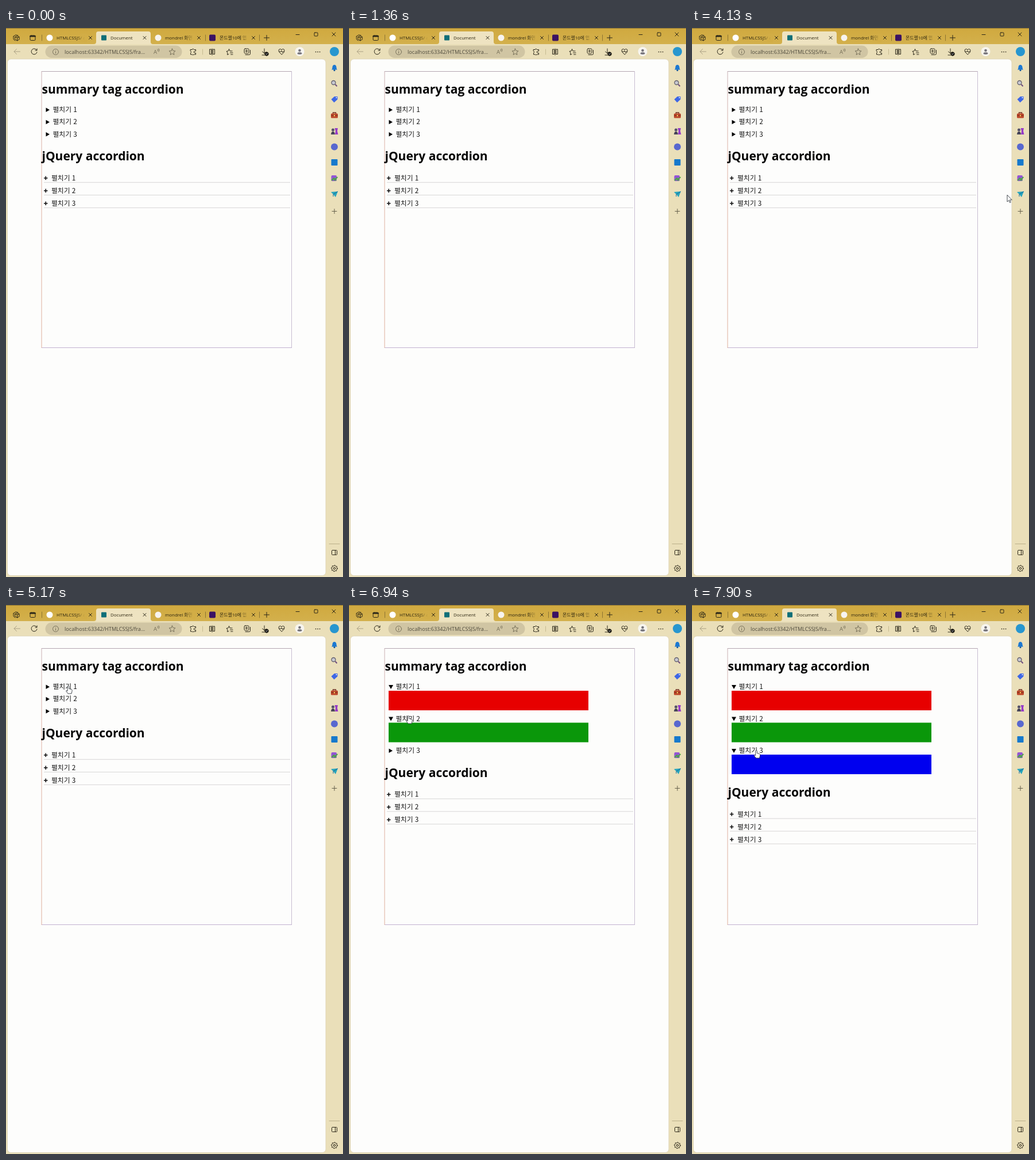
Recreate the animation shown at these times as an HTML page. Size 587 by 954 pixels, loop 8000 ms.

```html
<!DOCTYPE html>
<html lang="ko">
<head>
<meta charset="utf-8">
<title>Accordion demo</title>
<style>
  html, body { margin: 0; width: 100%; height: 100%; overflow: hidden; background: #eadfb9; }
  svg { display: block; width: 587px; height: 954px; }
  text { font-family: "Open Sans", "Noto Sans CJK KR", "Noto Sans CJK", sans-serif; fill: #151515; white-space: pre; }
  .heading { font-size: 21px; font-weight: 700; fill: #060606; }
  .row { font: 11.8px "Noto Sans CJK KR", "Noto Sans CJK", sans-serif; }
  .tab { font-size: 7.9px; fill: #2b240f; }
  .icon { fill: none; stroke: #2a2618; stroke-width: 1; stroke-linecap: round; stroke-linejoin: round; }
</style>
</head>
<body>
<svg viewBox="0 0 587 954">
  <defs>
    <linearGradient id="strip" x2="0" y2="1">
      <stop stop-color="#d0a93f"/><stop offset="1" stop-color="#d3b04c"/>
    </linearGradient>
    <linearGradient id="fade">
      <stop stop-color="#d2ad46" stop-opacity="0"/><stop offset=".8" stop-color="#d2ad46"/>
    </linearGradient>
    <linearGradient id="edge" x2="0" y2="1">
      <stop stop-color="#c8b0b4"/><stop offset=".3" stop-color="#dfb2a4"/><stop offset="1" stop-color="#dfae9c"/>
    </linearGradient>
  </defs>

  <!-- Window -->
  <rect width="587" height="954" fill="#eadfb9"/>
  <rect width="587" height="28" fill="url(#strip)"/>
  <path d="M0 .5H587" stroke="#8c7434"/>
  <path d="M153 28Q157 28 157 24V10Q157 6 161 6H248Q252 6 252 10V24Q252 28 256 28Z" fill="#eee3c1"/>
  <rect x="2.5" y="54" width="554.5" height="897.5" rx="6" fill="#fdfdfc" stroke="#d9ceb0" stroke-width=".7"/>

  <!-- Tabs -->
  <circle cx="76" cy="17" r="5.5" fill="#fff"/>
  <text class="tab" x="88" y="20">HTMLCSSJS/ a</text>
  <rect x="166" y="12.5" width="9" height="9" rx="1" fill="#0f6f78"/>
  <text class="tab" x="182" y="20">Document</text>
  <circle cx="265" cy="17" r="5.5" fill="#f7f4f0"/>
  <text class="tab" x="277" y="20">mondrel 화면</text>
  <rect x="354" y="11.5" width="11" height="11" rx="2" fill="#3b1263"/>
  <text class="tab" x="372" y="20">몬드렐10에 앱</text>
  <g id="tabEnds"></g>
  <g class="icon">
    <path d="M62.5 12V22M347.5 12V22M441.5 12V22" stroke="#8d7432"/>
    <path d="M449.500 17H458.500M454 12.500V21.500"/>
    <path d="M13 14.500L17 12L21 13M13 14.500V19.500L16 22M16 15.500L19.500 14L23 15.500V20L19.500 22L16 20ZM16 15.500L19.500 17L23 15.500M19.500 17V22"/>
    <rect x="42" y="13" width="9" height="8.500" rx="1.500"/>
    <path d="M42.500 14.300H50.500" stroke-width="2.500"/>
    <path d="M505 11.500H511M568 8L574 14M574 8L568 14"/>
    <rect x="537" y="8" width="6" height="6" rx="1"/>
  </g>

  <!-- Toolbar -->
  <rect x="68.500" y="30.500" width="238" height="21.500" rx="10.700" fill="#d0c5a3"/>
  <text x="102" y="44.700" font-size="9.150" style="fill:#4e4a3c">localhost:63342/HTMLCSSJS/fra...</text>
  <text x="257" y="45" font-size="9.500" style="fill:#777059">A</text>
  <g class="icon">
    <path d="M24.500 41H14M18.500 36.500L14 41L18.500 45.500" stroke="#aaa083"/>
    <path d="M53.500 38.500A5 5 0 1 0 54 42M54 36V39H51"/>
    <g stroke="#777059">
      <circle cx="86.500" cy="41.500" r="5"/><path d="M86.500 41V44M86.500 39V39.100"/>
      <path d="M264 37Q265.500 38.500 264 40M266 36Q268 38.500 266 41"/>
      <path id="star" d="M289.500 36L291.100 39.600L295 40L292 42.700L292.900 46.500L289.500 44.500L286.100 46.500L287 42.700L284 40L287.900 39.600Z"/>
    </g>
    <path d="M321.500 37.500H324.500Q325 34.500 327.500 37.500H330.500V40Q327 40 327 41.700Q327 43.500 330.500 43.500V46H327.500Q325 48 324.500 46H321.500V43.500Q324 42 321.500 40Z"/>
    <path d="M342.500 37V46" stroke="#c7bb91"/>
    <path d="M357 37H354.500V45.500H357ZM361 37H363.500V45.500H361ZM359 36V47"/>
    <path d="M388 45.500L385.500 46.500L386 43L384 40.500L387 40L388.500 36.500L390 40H394M390.500 43H395M391.500 46H395"/>
    <rect x="415" y="36" width="8" height="8" rx="1.500"/>
    <path d="M417 46.500H423.500Q425.500 46.500 425.500 44.500V38.500M419 38V42M417 40H421"/>
    <path d="M450 36V44M446.500 41L450 44L452 42M446 47H451"/>
    <circle cx="454" cy="45" r="3.200" fill="#111"/><path d="M452.500 45L453.700 46L455.500 44" stroke="#fff" stroke-width=".8"/>
    <path d="M480 46L475.500 41.500Q474 37 477.500 36.500Q479 36.500 480 38Q481 36.500 482.500 36.500Q486 37 484.500 41.500ZM476 41H479L480 39.500L481.500 42.500L482.500 41H484"/>
    <path d="M539.500 41.500H539.600M543 41.500H543.100M546.500 41.500H546.600" stroke-width="1.700"/>
  </g>
  <circle cx="511.500" cy="41" r="8" fill="#f7f5ef"/>
  <circle cx="511.500" cy="39" r="2.300" fill="#77757c"/>
  <path d="M507.500 45Q507.500 42.300 510 42.300H513Q515.500 42.300 515.500 45Q511.500 47 507.500 45Z" fill="#77757c"/>
  <circle cx="572" cy="41" r="8" fill="#2796cf"/>

  <!-- Sidebar -->
  <path d="M567 72.500Q568.500 71 568.500 68Q569 64 572 64Q575 64 575.500 68Q575.500 71 577 72.500Z" fill="#1b78d2"/>
  <circle cx="572" cy="73.500" r="1.500" fill="#0e559f"/>
  <circle cx="570.500" cy="95" r="3.500" fill="#c8c8d2" stroke="#62606c" stroke-width="1.300"/>
  <path d="M573.500 98L576.500 101.300" stroke="#6c4a7d" stroke-width="2"/>
  <path d="M566.500 124L572 119H577.500V124L571.500 129.500Z" fill="#3e67e5"/><circle cx="575.500" cy="121" r="1" fill="#fff"/>
  <path d="M569.500 149V147H574.500V149" fill="none" stroke="#722f22" stroke-width="1.300"/>
  <rect x="566" y="148.500" width="12" height="8" rx="1.500" fill="#bd482b"/><path d="M566 152H578" stroke="#752718"/>
  <rect x="571" y="151" width="2" height="2.500" fill="#efc15d"/>
  <path d="M573 185L574 179L572.500 174H578L577 179L578.500 185Z" fill="#963bc7"/>
  <circle cx="569.500" cy="177" r="2.500" fill="#555269"/><path d="M566 185Q566 182 568 180H571Q573 182 573 185Z" fill="#464458"/>
  <circle cx="572" cy="206.500" r="6" fill="#5868cf"/>
  <rect x="566.500" y="228" width="11" height="11" rx="1" fill="#1679cc"/>
  <rect x="566.500" y="256" width="9.500" height="10" rx="2" fill="#9454d5"/>
  <path d="M567 265L571 261L575 265M571 265L577.500 259" stroke="#49a647" stroke-width="2" fill="none"/>
  <path d="M566 285L578 284L574 294L571 290Z" fill="#26a5bd"/><path d="M578 284L570 289L570 293" fill="none" stroke="#156a9b"/>
  <g class="icon">
    <path d="M568 318.500H576M572 314.500V322.500" stroke="#655f4b"/>
    <path d="M563 896.500H581" stroke="#bbaf8a"/>
    <rect x="567.500" y="907.500" width="9" height="8" rx="1"/><path d="M573.500 907.500V915.500"/>
    <circle cx="572" cy="939" r="1.700"/>
    <path id="gear"/>
  </g>

  <!-- Page -->
  <g fill="none">
    <path d="M62 75.500H497.500" stroke="#b4a6b1"/>
    <path d="M497.500 75V556" stroke="#c8bdd2"/>
    <path d="M62 555.500H498" stroke="#c2b2d0"/>
    <rect x="61.500" y="75" width="1" height="481" fill="url(#edge)"/>
  </g>
  <text class="heading" x="62.500" y="114">summary tag accordion</text>
  <g id="details"></g>
  <g id="jquery"><text class="heading" x="62.500" y="230">jQuery accordion</text></g>

  <g id="cursor" fill="#fff" stroke="#333940" stroke-width=".9" stroke-linejoin="round">
    <path id="hand" d="M-1.300 7V.8Q0-.8 1.300 .8V5L5.500 6Q7 6.500 6.600 9L5.500 13.500H-.5L-3.600 9.500Q-4 7.800-2.600 8L-1.300 9Z"/>
    <path id="arrow" d="M0 0V12L2.800 9.500L4.600 13.500L6.300 12.700L4.500 8.800H8.300Z"/>
  </g>
</svg>
<script>
const LOOP = 8000, PITCH = 21.25, PANEL = 34.25;
const panels = [
  { color: '#e70000', opensAt: 5340 },
  { color: '#0a970a', opensAt: 6940 },
  { color: '#0000ef', opensAt: 7840 }
];
// Cursor rests and turning points: time, x, y
const path = [
  [3870, 560, 330], [4130, 549, 290], [4400, 549, 290], [5170, 108.5, 140.5],
  [5640, 108.5, 140.5], [6140, 101.5, 181.5], [6400, 92, 189],
  [6600, 92, 189], [6770, 103.5, 192.5], [6940, 103.5, 192.5],
  [7540, 112, 252.5], [LOOP, 112, 252.5]
];
const $ = id => document.getElementById(id);

function add(parent, tag, attrs, text = '') {
  const node = document.createElementNS('http://www.w3.org/2000/svg', tag);
  for (const key in attrs) node.setAttribute(key, attrs[key]);
  node.textContent = text;
  return parent.appendChild(node);
}
const move = (node, x, y) => node.setAttribute('transform', `translate(${x} ${y})`);
const show = (node, on) => node.setAttribute('visibility', on ? 'visible' : 'hidden');

for (const x of [147, 241.5, 336, 431]) {
  if (x !== 241.5) add($('tabEnds'), 'rect', { x: x - 24, y: 10, width: 18, height: 15, fill: 'url(#fade)' });
  add($('tabEnds'), 'path', { class: 'icon', d: `M${x - 2.5} 14.5l5 5m0-5l-5 5` });
}

const teeth = Array.from({ length: 32 }, (_, i) => {
  const angle = i * Math.PI / 16, radius = i % 4 < 2 ? 5.5 : 4.2;
  return `${572 + radius * Math.cos(angle)} ${939 + radius * Math.sin(angle)}`;
});
$('gear').setAttribute('d', `M${teeth.join('L')}Z`);

panels.forEach((panel, i) => {
  const label = `펼치기 ${i + 1}`;
  panel.row = add($('details'), 'g', {});
  add(panel.row, 'text', { class: 'row', x: 81.5, y: 146.2 }, label);
  panel.closed = add(panel.row, 'path', { d: 'M69.5 138.500L76 142.200L69.500 146Z' });
  panel.opened = add(panel.row, 'path', { d: 'M69 139H77L73 146Z' });
  panel.box = add(panel.row, 'rect', { x: 69, y: 149, width: 348, height: 34, fill: panel.color });

  const y = 260.8 + i * 22;
  add($('jquery'), 'path', { d: `M66 ${y}h6.500M69.250 ${y - 3.2}v6.400`, stroke: '#111', 'stroke-width': 1.6 });
  add($('jquery'), 'text', { class: 'row', x: 79, y: y + 4 }, label);
  add($('jquery'), 'path', { d: `M66 ${268.3 + i * 22}H495`, stroke: '#d8d6d6' });
});

function cursorAt(t) {
  const next = Math.max(1, path.findIndex(point => point[0] > t));
  const [t0, x0, y0] = path[next - 1], [t1, x1, y1] = path[next];
  const p = Math.min(1, Math.max(0, (t - t0) / (t1 - t0)));
  const eased = p * p * (3 - 2 * p);
  return [x0 + (x1 - x0) * eased, y0 + (y1 - y0) * eased];
}

function draw(t) {
  const [x, y] = cursorAt(t);
  let shift = 0, overPanel = false;
  panels.forEach((panel, i) => {
    const open = t >= panel.opensAt, top = i * PITCH + shift;
    move(panel.row, 0, top);
    show(panel.closed, !open);
    show(panel.opened, open);
    show(panel.box, open);
    if (open) {
      overPanel ||= y > top + 150 && y < top + 181;
      shift += PANEL;
    }
  });
  move($('jquery'), 0, shift);

  const visible = t >= path[0][0], pointing = x < 130 && !overPanel;
  move($('cursor'), x, y);
  show($('hand'), visible && pointing);
  show($('arrow'), visible && !pointing);
}

const start = performance.now();
function tick() {
  draw((performance.now() - start) % LOOP);
  requestAnimationFrame(tick);
}
tick();
</script>
</body>
</html>
```
